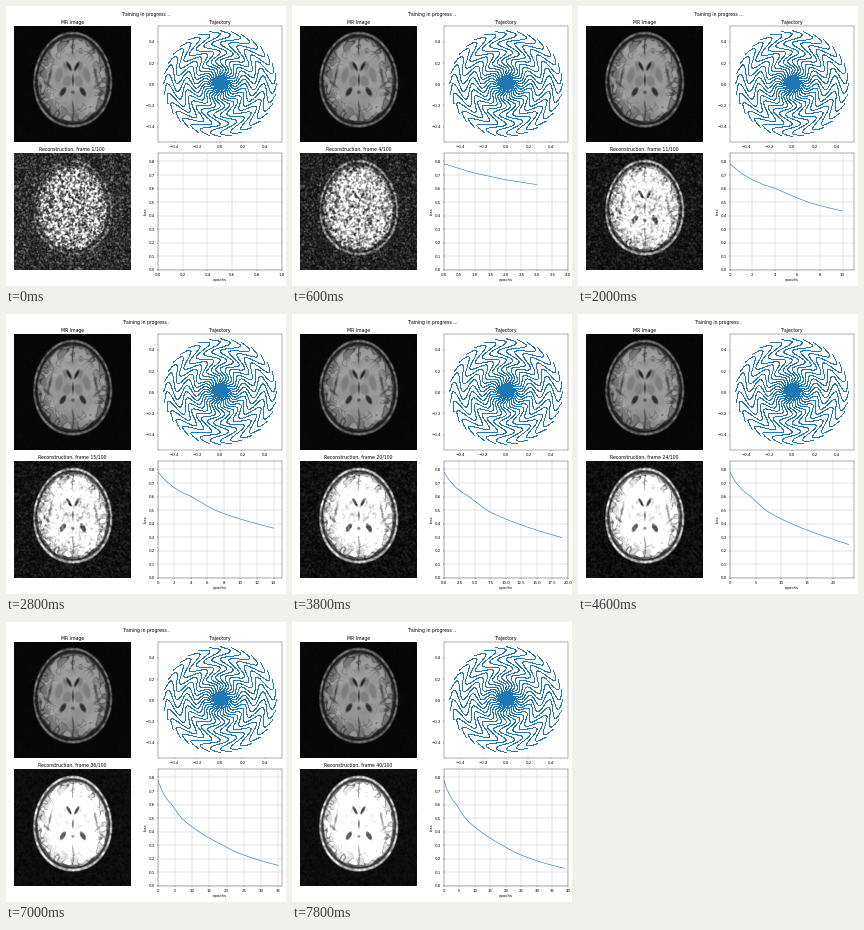
A matplotlib script for the animation above (8 s loop, 280 px wide and 280 px high).

```python
import numpy as np
import matplotlib.pyplot as plt
from matplotlib.animation import FuncAnimation

plt.rcParams["font.family"] = "DejaVu Sans"

SIZE, DPI = 280, 28
EPOCHS, STEP_MS = 40, 200
GRID = 234
rng = np.random.default_rng(7)

# Head coordinates in stage pixels
X, Y = np.meshgrid(np.linspace(8, 124.6, GRID), np.linspace(20, 136.5, GRID))


def smooth_noise(sigma):
    """Unit-variance Gaussian noise blurred by sigma grid cells."""
    f = np.fft.fftfreq(GRID)
    kernel = np.exp(-2 * (np.pi * sigma) ** 2 * (f[:, None] ** 2 + f ** 2))
    noise = np.fft.ifft2(np.fft.fft2(rng.normal(size=(GRID, GRID))) * kernel).real
    return noise / noise.std()


def depth(cx, cy, a, b, tilt=0, egg=0):
    """Approximate distance inside the edge of an ellipse."""
    t = np.radians(tilt)
    u = (X - cx) * np.cos(t) + (Y - cy) * np.sin(t)
    v = (Y - cy) * np.cos(t) - (X - cx) * np.sin(t)
    u = u / (1 + egg * v / b)
    return (1 - np.hypot(u / a, v / b)) * min(a, b)


def cover(d, soft=1.0):
    return np.clip(d / soft + 0.5, 0, 1)


def paint(img, mask, tone):
    return img * (1 - mask) + tone * mask


def draw_head():
    d = depth(66.5, 74.3, 39.4, 47.8, egg=0.06)
    folds, wide, speckle = smooth_noise(3.6), smooth_noise(6), smooth_noise(2)
    img = 0.02 + 0.008 * np.abs(smooth_noise(1))
    img = paint(img, cover(d), 0.38 + 0.07 * speckle)
    img = paint(img, cover(d - 2.1), 0.1)
    img = paint(img, cover(d - 3.6), 0.18 + 0.04 * speckle)
    d = d - 5 - 0.6 * wide
    brain = cover(d)

    white = cover(d - 5 - 3 * folds, 3)
    tissue = 0.46 + 0.14 * white + 0.02 * wide
    rim = np.clip(1.25 - d / 13, 0, 1)
    sulci = np.exp(-(folds / 0.22) ** 2) * rim
    tissue = tissue * (1 - 0.55 * sulci)
    img = paint(img, brain, tissue)

    # Fissures along the midline and at the sides
    mid = np.exp(-((X - 66.7 - 0.4 * np.sin(Y / 4)) / 0.7) ** 2)
    img = paint(img, 0.75 * mid * cover(49 - Y, 5) * brain, 0.14)
    img = paint(img, 0.65 * mid * cover(Y - 96, 5) * brain, 0.14)
    for side in (-1, 1):
        def part(dx, y, a, b, tilt, tone, soft=1.2, alpha=1):
            mask = alpha * cover(depth(66.7 + side * dx, y, a, b, side * tilt), soft)
            return paint(img, mask, tone)

        img = part(23, 70, 1.0, 8, -12, 0.2, 1.6, 0.8)
        img = part(25.5, 79, 1.0, 5, 50, 0.2, 1.6, 0.7)
        img = part(14, 70, 3.4, 8, -14, 0.49, 2)
        img = part(5.5, 76, 4.2, 5.5, -20, 0.5, 2)
        img = part(7.6, 61, 2, 4.5, 15, 0.48, 1.5)
        img = part(3.9, 61, 1.5, 4.8, 28, 0.14)
        img = part(10, 86.5, 2.3, 4.8, -32, 0.18)
    img = paint(img, cover(depth(66.7, 75, 0.8, 5)), 0.18)
    img = paint(img, 0.8 * cover(depth(66.7, 87, 1.8, 1.8)), 0.28)
    return np.clip(img, 0, 1), brain


head, brain = draw_head()
grain = smooth_noise(1.3) + 1j * smooth_noise(1.3)
spread = 0.14 + 0.16 * brain + 0.06 * np.exp(-((X - 66) ** 2 + (Y - 78) ** 2) / 2500)

# Loss falls smoothly between a few knots
knots = [0, 1, 2, 3, 4, 5, 6, 7, 8, 10, 14, 19, 23, 30, 39]
values = [0.783, 0.714, 0.665, 0.629, 0.602, 0.566, 0.53, 0.498, 0.474,
          0.434, 0.367, 0.298, 0.2465, 0.185, 0.129]
epochs = np.arange(EPOCHS)
loss = np.exp(np.interp(epochs, knots, np.log(values)))


def reconstruct(n):
    q = loss[n] / loss[0]
    gain = 2.0 - 1.1 * q ** 2
    return np.abs(gain * head + q ** 1.5 * spread * grain)


def draw_trajectory(ax, shots=32, zigzags=3, width=2):
    r = np.linspace(0, 0.5, 256)
    sway = width * np.pi / shots * np.sin(4 * np.pi * zigzags * r)
    arm = r * (1 + 1j * sway)
    for k in range(shots):
        z = arm * np.exp(2j * np.pi * k / shots)
        ax.plot(z.real, z.imag, ",", color="C0")
    ax.set(xlim=(-0.548, 0.548), ylim=(-0.55, 0.55))


fig = plt.figure(figsize=(SIZE / DPI, SIZE / DPI), dpi=DPI, facecolor="white")


def panel(left, top, right, bottom, title=""):
    ax = fig.add_axes([left / SIZE, 1 - bottom / SIZE,
                       (right - left) / SIZE, (bottom - top) / SIZE])
    ax.set_title(title)
    return ax


def show(ax, data):
    ax.axis("off")
    return ax.imshow(data, cmap="gray", vmin=0, vmax=1, aspect="auto")


heading = fig.suptitle("")
show(panel(8, 20, 124.6, 136.4, "MR Image"), head)
draw_trajectory(panel(151.8, 20, 275.8, 136.4, "Trajectory"))
recon_ax = panel(8, 147.2, 124.6, 263.8)
recon = show(recon_ax, reconstruct(0))
loss_ax = panel(151.8, 147.2, 275.8, 263.8)
loss_ax.set(xlabel="epochs", ylabel="loss", ylim=(0, 1.1 * loss[0]))
loss_ax.grid(True)
curve, = loss_ax.plot([], [], color="C0")


def update(n):
    heading.set_text("Training in progress " + "." * ((n + 1) % 3 + 1))
    recon_ax.set_title(f"Reconstruction, frame {n + 1}/100")
    recon.set_data(reconstruct(n))
    curve.set_data(epochs[:n + 1], loss[:n + 1])
    loss_ax.set_xlim(0, n + 1)
    return heading, recon, curve


anim = FuncAnimation(fig, update, frames=EPOCHS, interval=STEP_MS,
                     init_func=lambda: update(0), repeat=True,
                     repeat_delay=0, blit=False)
plt.show()
```
